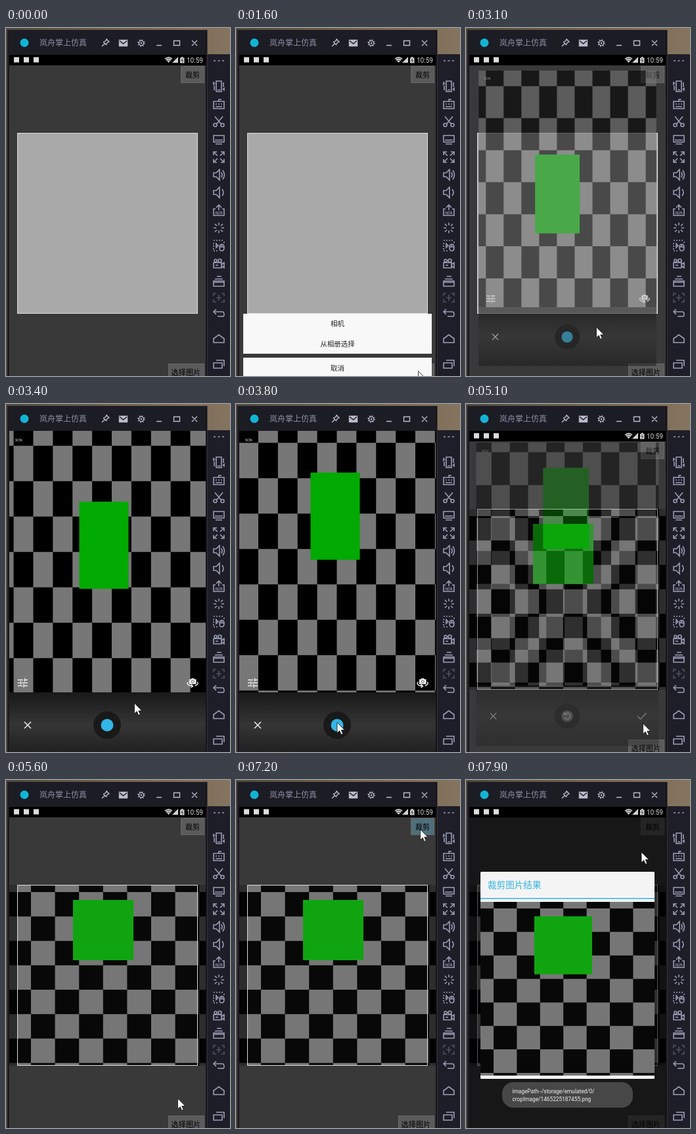
Write an HTML page that moves like this. It is 341 by 531 pixels and loops after 8 s.

```html
<!DOCTYPE html>
<html lang="zh">
<head>
<meta charset="utf-8">
<title>Image crop demo</title>
<style>
html, body { margin: 0; width: 100%; height: 100%; overflow: hidden; background: #1c1c26; }
svg { display: block; width: 100vw; height: 100vh; }
text { font-family: "Noto Sans CJK SC", "Noto Sans CJK", sans-serif; }
.latin { font-family: Roboto, sans-serif; }
.icon { fill: none; stroke: #9a9fb6; stroke-width: 1.6; }
.mid { text-anchor: middle; }
</style>
</head>
<body>
<svg viewBox="0 0 341 531">
  <defs>
    <linearGradient id="desk">
      <stop offset="0" stop-color="#51483d"/><stop offset=".6" stop-color="#75664f"/><stop offset="1" stop-color="#85745f"/>
    </linearGradient>
    <linearGradient id="metal" x2="0" y2="1">
      <stop offset="0" stop-color="#191919"/><stop offset=".5" stop-color="#353535"/><stop offset="1" stop-color="#1d1d1d"/>
    </linearGradient>
    <path id="checks"/>
    <clipPath id="screen"><rect x="5" y="41" width="299" height="490"/></clipPath>
    <clipPath id="preview"><rect x="5" y="41" width="299" height="399"/></clipPath>
    <clipPath id="photoBox"><rect x="5" y="160" width="299" height="276"/></clipPath>
    <clipPath id="resultBox"><rect x="22" y="186" width="265" height="265"/></clipPath>
    <clipPath id="titleBox"><rect x="50" y="10" width="73.5" height="26"/></clipPath>
  </defs>

  <!-- desktop and emulator window -->
  <rect width="341" height="531" fill="url(#desk)"/>
  <rect x="2" y="3" width="304.5" height="528" fill="#1c1c24"/>
  <rect x="306.5" y="40" width="35" height="491" fill="#1e1e28"/>
  <path d="M305 3V531" stroke="#14141a" stroke-width="2"/>
  <circle cx="28" cy="22.5" r="6.5" fill="#12b4d4"/>
  <text x="51" y="27" font-size="12" fill="#8c90a8" clip-path="url(#titleBox)">岚舟掌上仿真器</text>
  <g class="icon" style="stroke:#b9bccb;stroke-width:1.4">
    <path d="M153 17L157 21L154.500 22L152.500 25.500L148.500 21.500L152 19.500ZM150 24L146 28"/>
    <rect x="172.500" y="18.500" width="12" height="9" fill="#b9bccb"/>
    <path d="M173 19.500L178.500 24L184 19.500" stroke="#1c1c24"/>
    <circle cx="206" cy="23" r="3.600"/>
    <circle cx="206" cy="23" r="5" stroke-dasharray="1.6 2.330"/>
    <circle cx="206" cy="23" r=".6"/>
    <path d="M229 26.500H237M255.500 19.500H264.500V26.500H255.500ZM283 19L291 27M291 19L283 27"/>
  </g>
  <g id="tools" class="icon"></g>

  <g clip-path="url(#screen)">
    <!-- crop page -->
    <rect x="5" y="41" width="299" height="490" fill="#393939"/>
    <rect x="17" y="160.500" width="275" height="275.500" fill="#a9a9a9"/>
    <g id="photo" clip-path="url(#photoBox)">
      <rect x="5" y="160" width="299" height="276" fill="#767676"/>
      <use href="#checks" fill="#080808" transform="translate(38 171) scale(36.6 37.25)"/>
      <rect x="102" y="183" width="92" height="92" fill="#10a510"/>
      <path d="M5 160H17V436H5ZM292 160H304V436H292Z" opacity=".62"/>
    </g>
    <rect x="17.500" y="160.500" width="274" height="275" fill="none" stroke="#dedede"/>
    <rect id="cropBtn" x="266.500" y="58.500" width="35" height="25" fill="#5b5b5b" stroke="#696969"/>
    <text class="mid" x="284" y="76" font-size="11">裁剪</text>
    <rect x="247.500" y="512.500" width="54" height="25" fill="#5b5b5b" stroke="#696969"/>
    <text class="mid" x="274" y="529.500" font-size="11.200">选择图片</text>

    <!-- status bar -->
    <rect x="5" y="41" width="299" height="16"/>
    <path d="M12 44.500h8v8h-8zM27 44.500h8v8h-8zM42 44.500h8v8h-8z" fill="#dcdcdc"/>
    <path d="M241.500 46.500Q247.500 41.500 253.500 46.500L247.500 53ZM262 44V53H253ZM265 45.500H267V44H269.500V45.500H271.500V53.500H265Z" fill="#d0d0d0"/>
    <path d="M268.800 46.500L267 49.500H269.500L267.800 52.500M242 48.500Q247.500 44 253 48.500M244 50.500Q247.500 47.500 251 50.500" fill="none" stroke="#111" stroke-width=".8"/>
    <text class="latin" x="275" y="52.500" font-size="10" fill="#d8d8d8">10:59</text>

    <!-- action sheet -->
    <g id="sheet" font-size="10.500" fill="#222" class="mid">
      <path d="M11 436H298V497H11ZM11 503H298V531H11Z" fill="#f8f8f8"/>
      <text x="154.500" y="455">相机</text>
      <text x="154.500" y="486">从相册选择</text>
      <text x="154.500" y="522.500">取消</text>
    </g>

    <!-- camera -->
    <g id="camera">
      <rect x="5" y="41" width="299" height="399" fill="#777"/>
      <g clip-path="url(#preview)">
        <use id="board" href="#checks"/>
        <rect id="target" width="75" height="133" fill="#0a0"/>
      </g>
      <rect x="5" y="440" width="299" height="99" fill="url(#metal)"/>
      <text class="latin" x="14" y="57" font-size="5.500" fill="#ddd">SCN</text>
      <circle cx="154" cy="490" r="21" fill="#191919"/>
      <path d="M28 485L38 495M38 485L28 495" stroke="#eee" stroke-width="1.500"/>
      <g id="live" fill="none" stroke="#eee" stroke-width="1.500">
        <circle cx="154" cy="490" r="9.500" fill="#33b5e5" stroke="none"/>
        <path d="M18 421H26M29 421H33M28.500 418.500V423.500M18 425.500H21M24 425.500H33M22.500 423V428M18 430H25M28 430H33M27 427.500V432.500"/>
        <path d="M279 420H281.500L282.500 418.500H286L287 420H289.500V427.500H279Z" fill="#eee" stroke="none"/>
        <circle cx="284.300" cy="423.500" r="2" stroke="#666" stroke-width="1"/>
        <path d="M277.500 424Q274 427 279 429.500L284 430.500M281.500 428L284.500 430.500L281.500 433M291 424Q294.500 427 288 430"/>
      </g>
      <g id="review" fill="none" stroke="#eee" stroke-width="1.600">
        <circle cx="154" cy="490" r="9.500" fill="#777" stroke="none"/>
        <path d="M150 487A5 5 0 1 1 149.300 491.500M149.500 483.500V487.500H153.500"/>
        <path d="M269 490L274 495L283.500 485"/>
      </g>
    </g>

    <!-- result dialog and toast -->
    <rect id="dim" x="5" y="57" width="299" height="474"/>
    <g id="dialog">
      <rect x="22" y="140" width="265" height="316" rx="1.500" fill="#f4f4f4"/>
      <text x="33" y="165" font-size="13.600" fill="#33b5e5">裁剪图片结果</text>
      <rect x="22" y="180" width="265" height="1.500" fill="#33b5e5"/>
      <g clip-path="url(#resultBox)">
        <rect x="22" y="186" width="265" height="265" fill="#767676"/>
        <use href="#checks" fill="#080808" transform="translate(42 196) scale(35.4 35.85)"/>
        <rect x="104" y="208" width="88" height="88.500" fill="#10a510"/>
      </g>
    </g>
    <g id="toast" class="latin" font-size="8.300" fill="#f2f2f2">
      <rect x="55" y="461" width="199" height="39" rx="17" fill="#474747"/>
      <text class="latin" x="70.500" y="478">imagePath--/storage/emulated/0/</text>
      <text class="latin" x="70.500" y="490">cropImage/1465225187455.png</text>
    </g>
  </g>

  <path id="cursor" d="M0 0V16L3.700 12.600L6.200 18.300L8.700 17.200L6.300 11.600H11.400Z" fill="#fff" stroke="#111" stroke-width=".8"/>
</svg>
<script>
const LOOP = 8000, STEP = 100;
const $ = id => document.getElementById(id);

// Unit checkerboard; cell (0,0) stays light
let cells = '';
for (let i = -1; i < 11; i++)
  for (let j = -1; j < 9; j++)
    if ((i + j) & 1) cells += `M${i} ${j}h1v1h-1z`;
$('checks').setAttribute('d', cells);

// Toolbar icons, drawn around their centres: [y, path, opacity]
const icons = [
  [50, 'M-8 0h3M-1.500 0h3M5 0h3'],
  [89, 'M-4-8H4V8H-4ZM-2 5.500H2M-6-5L-8-3V-7M6 5L8 3V7M-7-1V6M7-6V1'],
  [116, 'M-8-4H8V7H-8ZM0-4V-7H4M-5 0h2M-1 0h2M3 0h2M-5 4H5'],
  [143, 'M-6-8L4 4M6-8L-4 4M-8 5a2.500 2.500 0 1 0 5 0a2.500 2.500 0 1 0-5 0M3 5a2.500 2.500 0 1 0 5 0a2.500 2.500 0 1 0-5 0'],
  [170, 'M-8-6H8V4H-8ZM-6 1H6M-5 7H5'],
  [197, 'M-8-3V-8H-3M3-8H8V-3M8 3V8H3M-3 8H-8V3M-7-7L-2-2M7-7L2-2M7 7L2 2M-7 7L-2 2'],
  [224, 'M-8-3H-4L1-8V8L-4 3H-8ZM4-4Q6 0 4 4M6-7Q11 0 6 7'],
  [251, 'M-8-3H-4L1-8V8L-4 3H-8ZM5-5Q9 0 5 5'],
  [278, 'M-5-2H-8V8H8V-2H5M0 0V-8M-4-4L0-8L4-4'],
  [305, 'M0-8V-4M0 4V8M-8 0H-4M4 0H8M-6-6L-3-3M6 6L3 3M-6 6L-3 3M6-6L3-3'],
  [332, 'M-8-8h2M-4-8h2M0-8h2M4-8h2M-8-4v2M-8 0v2M-8 4v2M-8 8h2M-4 8h2M8-6v2M-4-3L-1 0L-4 3ZM1 3Q1-2 4.500-2T8 3T4.500 8T1 3M1 2H8M4.500-2V2'],
  [359, 'M-8-1H4V7H-8ZM4 2L8-1V7L4 4M-7-4a2 2 0 1 0 4 0a2 2 0 1 0-4 0M-1-4a2.500 2.500 0 1 0 5 0a2.500 2.500 0 1 0-5 0M-5 3H-1'],
  [386, 'M-8 0H8V8H-8ZM-8 2H8M-6-3H6M-3-7H4'],
  [411, 'M-8-2V-6H-4M4-6H8V-2M8 3V7H4M-4 7H-8V3M0-4V5M-4 .5H4', .4],
  [435, 'M-4-6L-8-2L-4 2M-8-2H5Q8-2 8 2T5 5H-2'],
  [474, 'M-8 6V0L0-6L8 0V6Z'],
  [512, 'M-8-1H5V7H-8ZM-4-5H8V4']
];
$('tools').innerHTML = icons.map(([y, d, o = 1]) =>
  `<path transform="translate(324 ${y})" opacity="${o}" d="${d}"/>`).join('') +
  '<text class="latin mid" x="324" y="283.500" font-size="7.500" fill="#9a9fb6" stroke="none">apk</text>';

// Linear interpolation through rows of [time, ...values]
function at(rows, t) {
  const n = rows.findIndex(r => r[0] > t);
  if (n === 0) return rows[0].slice(1);
  if (n < 0) return rows[rows.length - 1].slice(1);
  const a = rows[n - 1], b = rows[n], k = (t - a[0]) / (b[0] - a[0]);
  return a.slice(1).map((v, i) => v + (b[i + 1] - v) * k);
}

const pointer = [
  [100, 321, 107], [500, 202, 330], [800, 270, 510], [1200, 277.5, 523.5], [2000, 277.5, 523.5],
  [2600, 198.5, 456.5], [3300, 198.5, 456.5], [3400, 195.5, 456.5], [3800, 154, 486], [4100, 155, 486],
  [4400, 213, 472], [4800, 270, 489], [5400, 269, 486], [5600, 261.5, 486], [5900, 258.5, 484],
  [6300, 258.5, 484], [6600, 251, 300], [7000, 280.5, 75.5], [7300, 280.5, 75.5], [7900, 267, 110]
];
const boardPath = [[3100, 17.2, 67.2], [3400, 11.6, 63.7], [4000, 0.3, 57]];
const targetPath = [[3100, 100, 182.5], [3400, 111.5, 149], [4000, 114.5, 82.5]];
const cameraFade = [[3000, .9, 0], [3100, .905, .565], [3200, .97, .9], [3300, 1, 1],
  [4900, 1, 1], [5000, .97, .75], [5100, .93, .35], [5200, .9, 0]];
const dialogFade = [[7300, .88, 0], [7400, .93, .35], [7500, .98, .8], [7600, 1, 1]];
const toastFade = [[7500, 0], [7800, 1]];

const show = (id, on) => $(id).style.display = on ? '' : 'none';
const move = (id, x, y, extra = '') => $(id).setAttribute('transform', `translate(${x} ${y}) ${extra}`);
function zoom(id, cx, cy, [s, alpha]) {
  move(id, cx, cy, `scale(${s}) translate(${-cx} ${-cy})`);
  $(id).setAttribute('opacity', alpha);
}

function draw(t) {
  show('cursor', t >= 100 && t < 900 || t >= 1200);
  move('cursor', ...at(pointer, t));
  show('sheet', t >= 1600 && t < 2900);

  show('camera', t > 3000 && t < 5200);
  zoom('camera', 154.5, 293.7, at(cameraFade, t));
  move('board', ...at(boardPath, t), 'scale(29.88 54)');
  move('target', ...at(targetPath, t));
  show('live', t < 4100);
  show('review', t >= 4100);

  show('photo', t >= 5000);
  $('cropBtn').setAttribute('fill', t >= 7200 && t < 7400 ? '#4f6f7c' : '#5b5b5b');

  const pop = at(dialogFade, t);
  zoom('dialog', 154.5, 298, pop);
  $('dim').setAttribute('opacity', pop[1] * .6);
  $('toast').setAttribute('opacity', at(toastFade, t)[0]);
}

const start = performance.now();
function tick(now) {
  const t = Math.max(0, now - start) % LOOP;
  draw(Math.floor(t / STEP) * STEP);
  requestAnimationFrame(tick);
}
draw(0);
requestAnimationFrame(tick);
</script>
</body>
</html>
```
